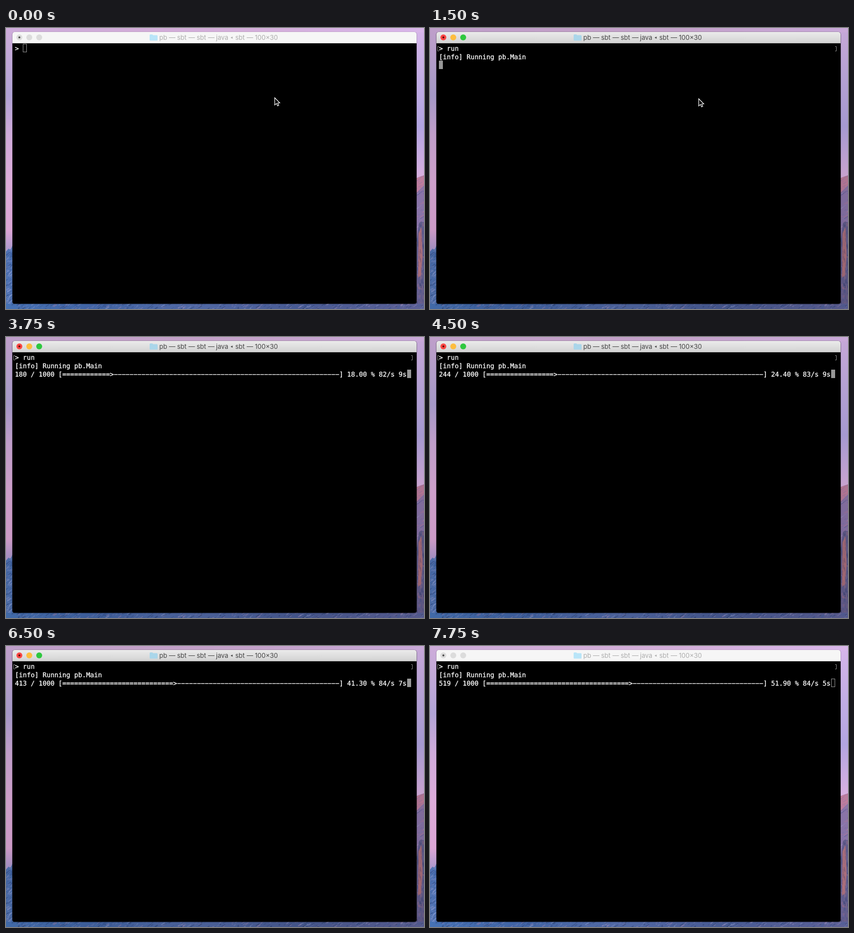
An HTML page with a canvas that plays this animation: 844x568 px, repeating every 8 s.

```html
<!DOCTYPE html>
<html lang="en">
<head>
<meta charset="utf-8">
<title>Terminal progress bar</title>
<style>
  html, body { margin: 0; width: 100%; height: 100%; overflow: hidden; background: #b79bcd; }
  canvas, svg { position: absolute; left: 0; top: 0; width: 844px; height: 568px; }
  .idle canvas { filter: brightness(1.08); }
  .shadow { fill: #000; opacity: .35; }
  .bar { fill: url(#chrome); }
  .edge { fill: #b4b4b4; }
  .red { fill: #fc4744; }
  .yellow { fill: #fdbd3f; }
  .green { fill: #2fc83f; }
  .dot { fill: #5c0b08; }
  .folder { fill: #aad6ea; }
  .title { font: 13px Inter, "Open Sans", sans-serif; fill: #454545; }
  .idle .shadow { opacity: .18; }
  .idle .bar { fill: #f6f6f6; }
  .idle .edge { fill: #d4d4d4; }
  .idle .light { fill: #dcdcdc; }
  .idle .dot { fill: #4c4c4c; }
  .idle .folder { fill: #b9e5f8; }
  .idle .title { fill: #adadad; }
  .mono {
    font: 13.288px "DejaVu Sans Mono", "Liberation Mono", monospace;
    fill: #fff; stroke: #fff; stroke-width: .3px;
    white-space: pre; text-rendering: geometricPrecision;
  }
  .mark { fill: none; stroke: #8c8c8c; }
  #cursor { fill: #979797; stroke: #979797; }
  .idle #cursor { fill: none; }
</style>
</head>
<body class="idle">
<canvas id="wall" width="844" height="568"></canvas>
<svg viewBox="0 0 844 568">
  <defs>
    <linearGradient id="chrome" x2="0" y2="1">
      <stop stop-color="#ebebeb"/><stop offset="1" stop-color="#d3d3d3"/>
    </linearGradient>
  </defs>
  <rect class="shadow" x="12" y="7.500" width="818" height="551" rx="6"/>
  <rect x="13" y="12" width="816" height="545.500" rx="4"/>
  <path class="bar" d="M13 30V13a5 5 0 0 1 5-5H824a5 5 0 0 1 5 5V30Z"/>
  <rect class="edge" x="13" y="30" width="816" height="1"/>
  <circle class="light red" cx="27" cy="19" r="6"/>
  <circle class="light yellow" cx="47" cy="19" r="6"/>
  <circle class="light green" cx="67" cy="19" r="6"/>
  <circle class="dot" cx="27" cy="19" r="2"/>
  <path class="folder" d="M290 14.500q0-1.500 1.500-1.500h4l1.500 1.500h7.500q1.500 0 1.500 1.500v8q0 1.500-1.500 1.500h-13q-1.500 0-1.500-1.500Z"/>
  <g class="title">
    <text y="24"><tspan x="309.500">pb</tspan><tspan x="329">—</tspan><tspan x="345.500">sbt</tspan><tspan x="368.500">—</tspan><tspan x="385">sbt</tspan><tspan x="408">—</tspan><tspan x="424">java</tspan><tspan x="463">sbt</tspan><tspan x="486">—</tspan><tspan x="502.500">100×30</tspan></text>
    <path d="M453.500 19.500l4-2.300v4.600Z"/>
  </g>
  <g id="marks" class="mark">
    <path d="M18 37.500h-2.500v9h2.500M818 37.500h2.500v9h-2.500"/>
  </g>
  <rect id="cursor" width="7" height="16"/>
  <g class="mono">
    <text id="prompt" x="18" y="46"></text>
    <text id="info" x="18" y="63">[info] Running pb.Main</text>
    <text id="progress" x="18" y="80"></text>
  </g>
  <path id="pointer" d="M.6 1V15.600L4.100 12.400L6.300 17.500L8.700 16.500L6.600 11.500H10.800Z" fill="#000" stroke="#fff" stroke-width="1.200"/>
</svg>
<script>
const el = id => document.getElementById(id);
const LOOP = 8000, STEP = 250, COLS = 99, TOTAL = 1000;
const START = 1555;

function paintWall() {
  const c = el('wall').getContext('2d');
  let seed = 11;
  const rnd = () => (seed = seed * 16807 % 2147483647) / 2147483647;

  const fade = (x, y, w, h, across, stops) => {
    const g = c.createLinearGradient(0, 0, across ? 844 : 0, across ? 0 : 568);
    stops.forEach(([at, color]) => g.addColorStop(at, color));
    c.fillStyle = g;
    c.fillRect(x, y, w, h);
  };

  // Rock face: a filled outline with slanted strata inside it
  const rock = (points, base, tones, n, [x, y, w, h], slant) => {
    c.save();
    c.beginPath();
    points.forEach(p => c.lineTo(...p));
    c.closePath();
    c.fillStyle = base;
    c.fill();
    c.clip();
    for (let i = 0; i < n; i++) {
      const px = x + rnd() * w, py = y + rnd() * h, len = 3 + rnd() * 7;
      c.strokeStyle = tones[Math.floor(rnd() * tones.length)];
      c.globalAlpha = .25 + rnd() * .4;
      c.lineWidth = .7 + rnd() * 1.3;
      c.beginPath();
      c.moveTo(px, py);
      c.lineTo(px + len * Math.cos(slant), py + len * Math.sin(slant));
      c.stroke();
    }
    c.restore();
  };

  fade(0, 0, 422, 568, false, [[0, '#bf9fca'], [.14, '#b09cc8'], [.24, '#a598c7'],
    [.38, '#c09eca'], [.55, '#cd9fca'], [.72, '#cc9ac6'], [.78, '#a68fc0']]);
  fade(422, 0, 422, 568, false, [[0, '#c6a8d8'], [.15, '#b7a2d4'], [.35, '#a599d0'],
    [.45, '#b99fd0'], [.53, '#c8a3cf']]);
  fade(0, 0, 844, 9, true, [[0, '#be9fca'], [.3, '#c2a0c8'], [.6, '#c4a2ca'], [1, '#c9a9d9']]);

  rock([[0, 452], [5, 446], [9, 448], [14, 438], [14, 568], [0, 568]], '#4a6ba6',
    ['#2a4378', '#8b98c6', '#36599b', '#7c83b5'], 170, [-3, 436, 18, 132], -.7);
  rock([[828, 304], [835, 301], [844, 298], [844, 568], [828, 568]], '#7f6b9c',
    ['#a06e90', '#565489', '#958ab4', '#6a629a'], 130, [826, 325, 18, 240], -.6);
  rock([[828, 304], [835, 301], [844, 298], [844, 318], [828, 334]], '#ae7492',
    ['#c4788a', '#8f6c98'], 40, [826, 298, 18, 36], -.6);
  rock([[828, 436], [834, 394], [838, 391], [844, 393], [844, 568], [828, 568]], '#5c5682',
    ['#9a6a80', '#2f3a68', '#7b6c9c', '#3a4a82'], 130, [826, 392, 18, 176], 1.5);
  rock([[833, 415], [839, 402], [841, 460], [838, 500], [832, 505]], '#9a6572',
    ['#be7474', '#6a4c6a', '#4a4470'], 45, [830, 400, 12, 110], 1.5);
  fade(0, 557, 844, 11, true, [[0, '#416aa8'], [.2, '#3c5d99'], [.45, '#4b6199'],
    [.7, '#435489'], [1, '#575a8c']]);
  rock([[0, 557], [844, 557], [844, 568], [0, 568]], 'transparent',
    ['#263d70', '#7f8cba', '#3d5791', '#8c7ba6', '#25375f'], 420, [0, 555, 844, 14], -.55);
}

// Items finished at time t, linear between a few known points
function itemsAt(t) {
  const points = [[START, 0], [3000, 118], [3750, 180], [5500, 330], [6500, 413], [7750, 519]];
  const i = Math.max(1, points.findIndex(p => t <= p[0]));
  const [[t0, n0], [t1, n1]] = [points[i - 1], points[i]];
  return Math.round(n0 + (n1 - n0) * (t - t0) / (t1 - t0));
}

function progressLine(t) {
  const n = itemsAt(t);
  const speed = n / (t - START) * 1000;
  const left = Math.floor((TOTAL - n) / speed);
  const head = `${n} / ${TOTAL} [`;
  const tail = `] ${(n / TOTAL * 100).toFixed(2)} % ${Math.round(speed)}/s ${left}s`;
  const width = COLS - head.length - tail.length;
  const done = Math.floor(width * n / TOTAL);
  return head + '='.repeat(done) + '>' + '−'.repeat(width - done - 1) + tail;
}

const show = (id, on) => el(id).setAttribute('visibility', on ? 'visible' : 'hidden');

function draw(ms) {
  const t = Math.floor(ms % LOOP / STEP) * STEP;
  const typed = t < 750 ? '' : t < 1000 ? 'ru' : 'run';
  const running = t >= 1500;
  const line = t >= 1750 ? progressLine(t) : '';
  const col = running ? line.length : 2 + typed.length;

  document.body.className = t < 250 || t >= 7500 ? 'idle' : '';
  el('prompt').textContent = '> ' + typed;
  el('progress').textContent = line;
  show('info', running);
  show('marks', running);
  show('pointer', t < 2000);
  el('pointer').setAttribute('transform', `translate(542 ${t < 250 ? 140 : 142})`);
  el('cursor').setAttribute('x', 18.5 + col * 8);
  el('cursor').setAttribute('y', running ? 66.5 : 32.5);
}

paintWall();
const begin = performance.now();
function tick() {
  draw(performance.now() - begin);
  requestAnimationFrame(tick);
}
tick();
</script>
</body>
</html>
```
